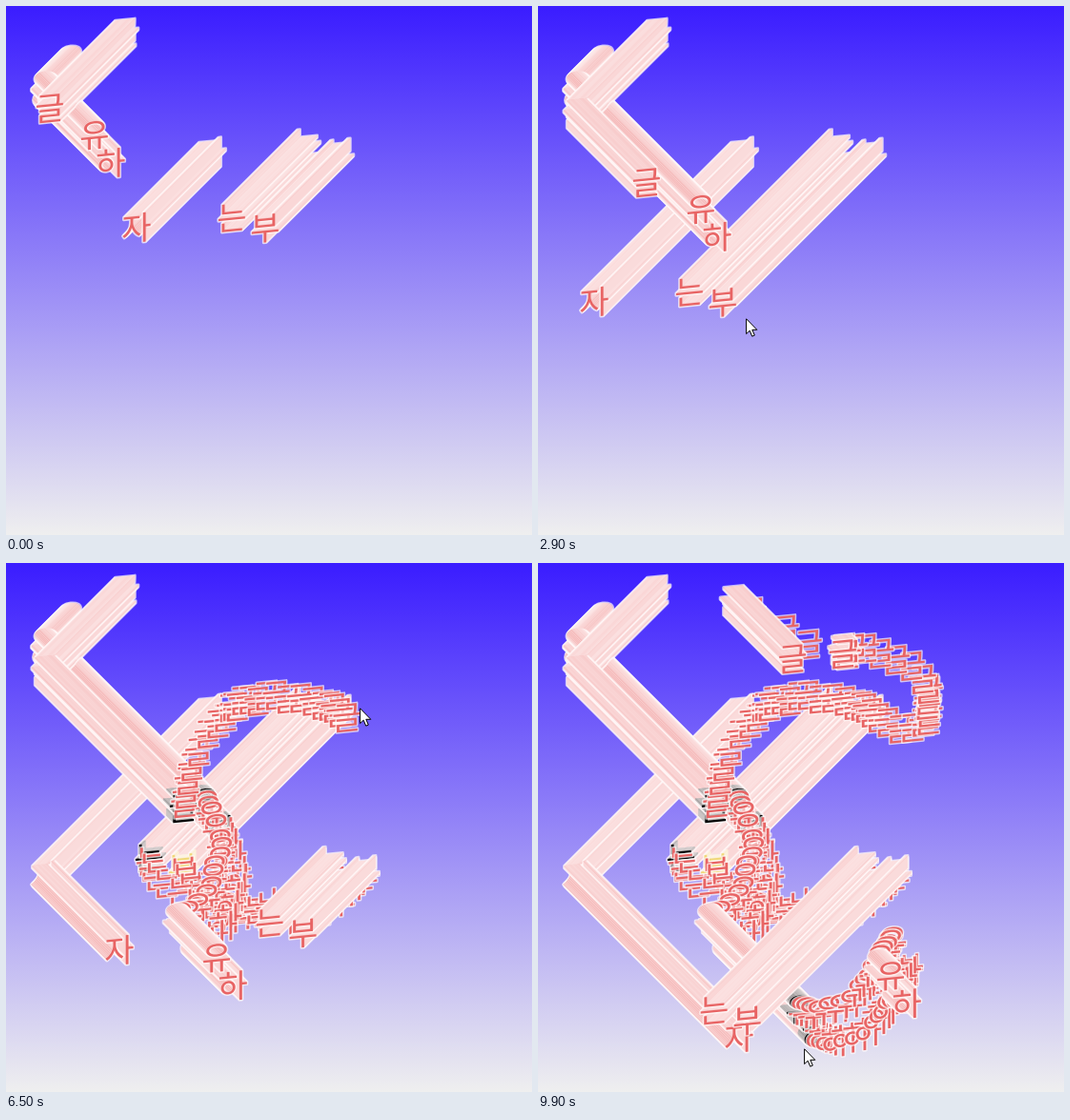
Recreate the animation shown at these times as an HTML page with a canvas. Size 552 by 556 pixels, loop 10000 ms.

```html
<!DOCTYPE html>
<html lang="ko">
<head>
<meta charset="utf-8">
<title>떠다니는 글자</title>
<style>
  html, body { margin: 0; width: 100%; height: 100%; overflow: hidden; }
  body { position: relative; background: linear-gradient(#3a1cff, #efefef) no-repeat; }
  canvas, svg { position: absolute; left: 0; top: 0; display: block; }
</style>
</head>
<body>
<canvas id="trail" width="552" height="556"></canvas>
<svg id="cursor" width="14" height="21" viewBox="0 0 14 21">
  <path d="M.6 .8V16.6L4.2 13.2L6.7 19.2L9.3 18.1L6.8 12.3H11.8Z" fill="#fff" stroke="#000"/>
</svg>
<script>
const LOOP = 10000, FRAME = 100;
const SPEED = 0.0269;          // px per ms on each axis
const STEP = 1 / SPEED;        // one stamp per pixel of drift
const LEAD = 79;               // stamps already laid when the loop starts
const WALL = 41;
const RED = '#e86464', BLACK = '#000', YELLOW = '#f0d878';

// Each body drifts down at 45 degrees (d: horizontal direction) until dragged
// along a Bezier curve (a, b: controls, end) and let go in a new direction.
// hover: how long the glyphs change colour before the grab.
const bodies = [
  { glyphs: [['자', 0, 0]], x: 137, y: 234, d: -1, drags: [] },
  {
    glyphs: [['글', 0, 0]], x: 46, y: 108, d: -1, grab: [3, -16],
    drags: [
      { from: 5590, to: 6400, a: [205, 130], b: [275, 128], end: [345, 153], d: 1, hover: 300 },
      { from: 6400, to: 7150, a: [430, 225], b: [445, 85], end: [318, 90], d: 1 },
      { from: 7420, to: 7580, a: [290, 92], b: [240, 62], end: [205, 39], d: 1 }
    ]
  },
  {
    glyphs: [['유', 0, 0], ['하', 17, 30]], x: 93, y: 136, d: 1, grab: [24, 30],
    drags: [
      { from: 4330, to: 4900, a: [232, 285], b: [232, 360], end: [179, 373], d: 1, hover: 200 },
      { from: 8500, to: 9400, a: [345, 500], b: [400, 340], end: [357, 421], d: 1, hover: 300 }
    ]
  },
  {
    glyphs: [['는', 0, 0], ['부', 35, 11, YELLOW]], x: 237, y: 223, d: -1, grab: [6, 0],
    drags: [
      { from: 3250, to: 4000, a: [180, 385], b: [330, 375], end: [343, 312], d: -1, hover: 200 }
    ]
  }
];

const canvas = document.getElementById('trail');
const ctx = canvas.getContext('2d');
const cursor = document.getElementById('cursor');

const bounce = x => WALL + Math.abs(x - WALL);

const bezier = (p, a, b, q, u) => [0, 1].map(k =>
  (1 - u) ** 3 * p[k] + 3 * u * (1 - u) ** 2 * a[k] + 3 * u * u * (1 - u) * b[k] + u ** 3 * q[k]);

// An unsteady hand: slow at the ends and in the middle, with a slight shake
function handMove(drag, start, t) {
  const u = (t - drag.from) / (drag.to - drag.from);
  const eased = u - 0.5 * Math.sin(4 * Math.PI * u) / (4 * Math.PI);
  const [x, y] = bezier(start, drag.a, drag.b, drag.end, eased);
  const shake = 3 * Math.sin(Math.PI * u);
  return [x + shake * Math.sin(t * 0.7), y + shake * Math.sin(t * 0.9)];
}

function place(body, t) {
  let { x, y, d } = body, since = 0;
  const drift = at => [x + d * (at - since) * SPEED, y + (at - since) * SPEED];
  for (const drag of body.drags) {
    if (t <= drag.from) break;
    if (t < drag.to) {
      const [sx, sy] = drift(drag.from);
      return handMove(drag, [bounce(sx), sy], t);
    }
    [x, y] = drag.end;
    d = drag.d;
    since = drag.to;
  }
  return drift(t);
}

function stamp(body, t) {
  const [x, y] = place(body, t);
  const hovered = body.drags.some(g => t > g.from - (g.hover || 0) && t <= g.from && g.hover);
  for (const [char, dx, dy, tint = BLACK] of body.glyphs) {
    ctx.setTransform(1, -0.1, 0, 1, bounce(x + dx), y + dy);
    ctx.strokeText(char, 0, 12);
    ctx.fillStyle = hovered ? tint : RED;
    ctx.fillText(char, 0, 12);
  }
}

let laid = 0;

function drawTrail(t) {
  const target = Math.floor(t / STEP) + LEAD + 1;
  if (target < laid) {
    ctx.setTransform(1, 0, 0, 1, 0, 0);
    ctx.clearRect(0, 0, canvas.width, canvas.height);
    laid = 0;
  }
  for (; laid < target; laid++) {
    for (const body of bodies) stamp(body, (laid - LEAD) * STEP);
  }
}

function held(body, t) {
  const [x, y] = place(body, t);
  return [t, bounce(x) + body.grab[0], y + body.grab[1]];
}

// The pointer wanders between a few spots and the ends of every drag
const pointer = [
  [2400, 235, 459], [2900, 218, 328], [4300, 232, 282], [5500, 189, 244],
  [7400, 227, 68], [7750, 440, 190], [9900, 279, 510],
  ...bodies.flatMap(body => body.drags.flatMap(g => [held(body, g.from), held(body, g.to)]))
].sort((p, q) => p[0] - q[0]);

function pointerAt(t) {
  for (const body of bodies) {
    if (body.drags.some(g => t > g.from && t < g.to)) return held(body, t).slice(1);
  }
  const i = pointer.findIndex(p => p[0] >= t);
  const b = pointer[i], a = pointer[Math.max(0, i - 1)];
  const f = a === b ? 0 : (t - a[0]) / (b[0] - a[0]);
  return [1, 2].map(k => a[k] + (b[k] - a[k]) * f);
}

function drawCursor(t) {
  const [x, y] = pointerAt(t).map(Math.round);
  cursor.style.visibility = t < pointer[0][0] ? 'hidden' : 'visible';
  cursor.style.transform = `translate(${x}px, ${y}px)`;
}

ctx.font = '500 34px "Noto Sans CJK KR", "Noto Sans CJK", sans-serif';
ctx.textAlign = 'center';
ctx.lineJoin = 'round';
ctx.lineWidth = 3;
ctx.strokeStyle = 'rgba(255, 248, 248, 0.7)';

const begin = performance.now();

function tick() {
  const t = Math.floor((performance.now() - begin) % LOOP / FRAME) * FRAME;
  drawTrail(t);
  drawCursor(t);
  requestAnimationFrame(tick);
}

tick();
</script>
</body>
</html>
```
